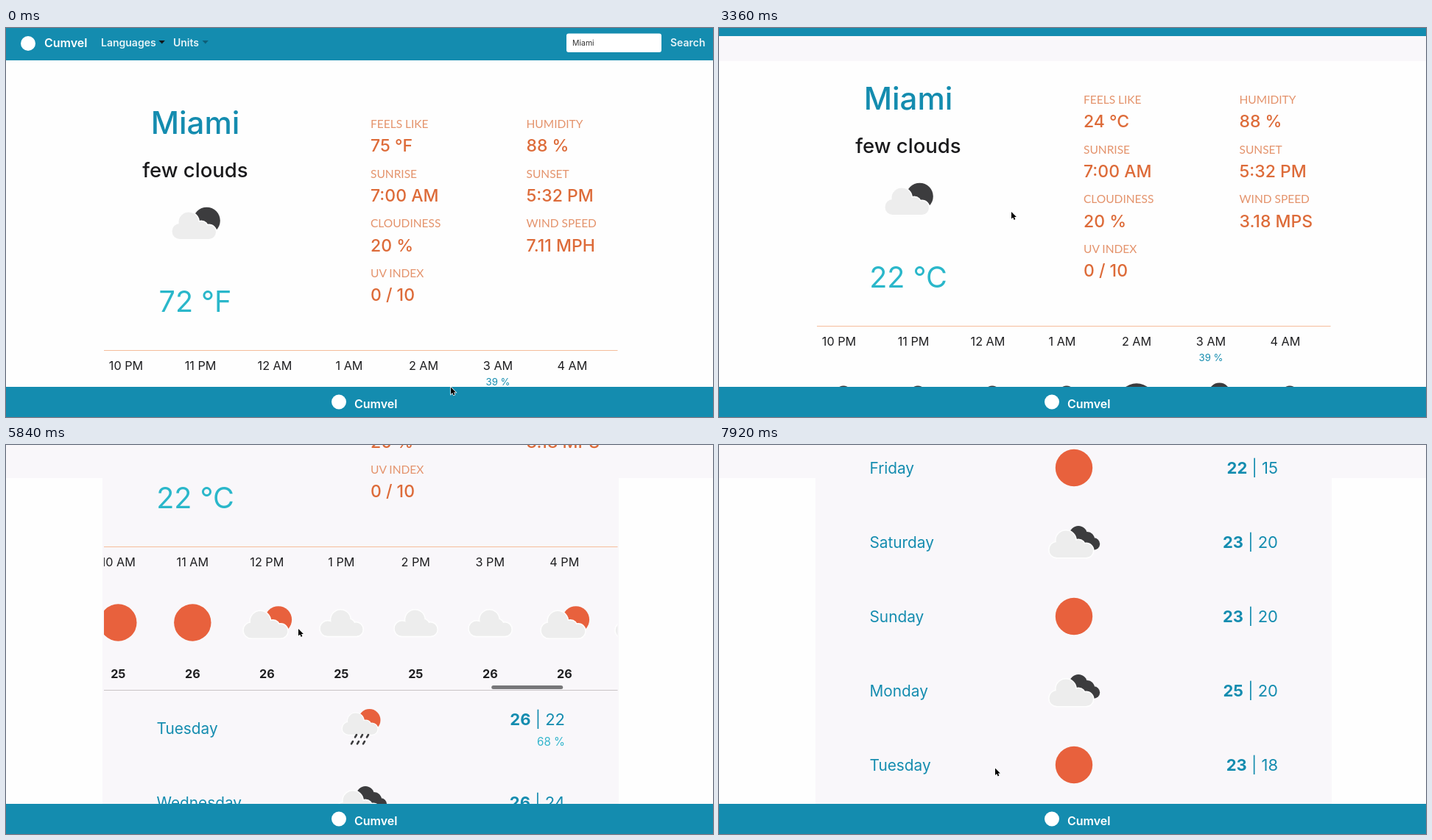
An HTML page for the animation above (8000 ms loop, 960 by 529 pixels).

```html
<!DOCTYPE html>
<html lang="en">
<head>
<meta charset="utf-8">
<title>Weather</title>
<style>
  html, body { margin: 0; height: 100%; overflow: hidden; background: #fefefe; }
  svg { display: block; font-family: Inter, "Noto Sans", sans-serif; }
  .mid { text-anchor: middle; }
  .end { text-anchor: end; }
  .brand { font-size: 16px; font-weight: 600; fill: #fff; }
  .nav { font-size: 14px; font-weight: 600; fill: #e6f3f7; }
  .small { font-size: 10.5px; fill: #333; }
  .city { font-size: 42px; font-weight: 500; fill: #148caf; }
  .sky { font-size: 27.5px; font-weight: 500; fill: #1a1a1c; }
  .now { font-size: 39.5px; fill: #2ab7ca; }
  .label { font: 15.5px Lato, sans-serif; fill: #e4936c; }
  .value { font-size: 23px; font-weight: 500; fill: #dd6b39; }
  .hour { font-size: 16.2px; fill: #1e1e20; }
  .bold { font-weight: 700; }
  .chance { font-size: 13.2px; fill: #148caf; }
  .day { font-size: 20.8px; fill: #148caf; }
  .range { font-size: 22px; fill: #148caf; }
  .dayChance { font-size: 15.2px; fill: #33b5cc; }
  .status { font: 8.6px "Liberation Sans", sans-serif; fill: #e4e4e4; }
</style>
</head>
<body>
<svg id="stage" width="960" height="529" viewBox="0 0 960 529"></svg>
<script>
const LOOP = 8000, STEP = 80;
const BLUE = '#148caf', SUN = '#e8613d', DARK = '#3c3c3e', PAPER = '#fefefe', TINT = '#f9f7fa';
const OPEN_MENU = 1360, ON_CELSIUS = 2400, CLOSE_MENU = 2640, METRIC = 2800;

const text = (x, y, cls, content, id = '') =>
  `<text x="${x}" y="${y}" class="${cls}"${id && ` id="${id}"`}>${content}</text>`;
const rect = (x, y, w, h, fill, extra = '') =>
  `<rect x="${x}" y="${y}" width="${w}" height="${h}" fill="${fill}" ${extra}/>`;
const disc = (x, y, r, fill) => `<circle cx="${x}" cy="${y}" r="${r}" fill="${fill}"/>`;
const group = (x, y, content) => `<g transform="translate(${x} ${y})">${content}</g>`;
const caret = (x, id) => `<path id="${id}" d="M${x} 17h8.4l-4.2 4.4z"/>`;

// Weather icons, each centred on 0,0
const ring = (x, y, r) =>
  `M${x - r} ${y}a${r} ${r} 0 1 1 ${2 * r} 0a${r} ${r} 0 1 1 ${-2 * r} 0z`;
const cloud = (x, y, scale = 1, peak = -9) =>
  `<path transform="translate(${x} ${y}) scale(${scale})" fill="#ededed"
    stroke="${PAPER}" stroke-width="3" paint-order="stroke"
    d="${ring(-21, 10.5, 10.5)}${ring(peak, -2, 13.5)}${ring(8, 6, 9)}${ring(18.5, 11.5, 9.5)}M-21 8h39v13h-39z"/>`;
const few = color => disc(15.5, -4, 18.3, color) + cloud(0, 0);
const drops = Array.from({ length: 6 }, (_, i) =>
  `M${-6 + i % 3 * 8 - (i > 2) * 5} ${i > 2 ? 18 : 9}l-2 3.400`).join('');
const rain = color => disc(11.5, -11, 15, color) + cloud(0, -8, .8) +
  `<path d="${drops}" stroke="${DARK}" stroke-width="2.6" stroke-linecap="round"/>`;
const icons = {
  S: disc(0, 0, 25.2, SUN),
  M: disc(0, 0, 25.2, DARK),
  C: cloud(2, -2, .97, -3),
  D: few(SUN),
  N: few(DARK),
  B: disc(6, -10, 12, DARK) + disc(18, -4, 10, DARK) + disc(27, 2.5, 8.2, DARK) + cloud(-2, 0),
  R: rain(DARK),
  W: rain(SUN)
};
const icon = (x, y, kind) => group(x, y, icons[kind]);

const header = rect(0, 0, 960, 44, BLUE) + disc(30, 21, 10, '#fff') +
  text(52, 26, 'brand', 'Cumvel') +
  text(129, 25, 'nav', 'Languages') + caret(207.5, 'langCaret') +
  text(227, 25, 'nav', 'Units') + caret(266.5, 'unitCaret') +
  rect(761, 7.5, 129, 25.5, '#fff', 'rx="3"') + text(769, 24, 'small', 'Miami') +
  text(902, 25, 'nav', 'Search');

const menu = '<g id="menu">' +
  rect(222.5, 37.5, 107, 65, '#fff', 'rx="3" stroke="#000" stroke-opacity=".16"') +
  rect(223, 38, 106, 31, '#f8f6fa', 'id="hoverRow"') + rect(223, 69, 106, 1, '#e9ecef') +
  rect(223, 75, 106, 22, '#0070fb', 'id="activeRow"') +
  text(238.5, 57.3, 'small', 'Fahrenheit') +
  text(238.5, 90.3, 'small', 'Celsius', 'celsius') + '</g>';

const details = [
  ['FEELS LIKE', '', 'feels'], ['HUMIDITY', '88 %'],
  ['SUNRISE', '7:00 AM'], ['SUNSET', '5:32 PM'],
  ['CLOUDINESS', '20 %'], ['WIND SPEED', '', 'wind'],
  ['UV INDEX', '0 / 10']
].map(([label, value, id], i) => {
  const x = i % 2 ? 706.5 : 495, y = 136 + Math.floor(i / 2) * 67.7;
  return text(x, y, 'label', label) + text(x, y + 32.3, 'value', value, id);
}).join('');

const current = text(257, 143.5, 'city mid', 'Miami') +
  text(257, 203, 'sky mid', 'few clouds') + icon(257, 266, 'N') +
  text(257, 386, 'now mid', '', 'now');

// One letter per hour for the sky, one digit for the degrees above 20
const hourSky = 'BBBBMRBBNDSSSSDCCCDDNNNM', hourDegrees = '444444332345566556653222';
const hours = [...hourSky].map((kind, i) => {
  const x = 163 + i * 101, h = (22 + i) % 24;
  return text(x, 464.5, 'hour mid', `${h % 12 || 12} ${h < 12 ? 'AM' : 'PM'}`) +
    (kind === 'R' ? text(x, 485.500, 'chance mid', '39 %') : '') +
    icon(x, 541.5, kind) + text(x, 616.5, 'hour bold mid', 2 + hourDegrees[i]);
}).join('');

const days = [
  'Tuesday W 26 22 68', 'Wednesday B 26 24', 'Thursday B 25 19', 'Friday S 22 15',
  'Saturday B 23 20', 'Sunday S 23 20', 'Monday B 25 20', 'Tuesday S 23 18'
].map((line, i) => {
  const [name, kind, high, low, chance] = line.split(' '), y = 685 + i * 101;
  return text(204.5, y + 7.5, 'day', name) + icon(482, y, kind) +
    text(759, y + (chance ? -4 : 8), 'range end', `<tspan class="bold">${high}</tspan> | ${low}`) +
    (chance ? text(759, y + 23.5, 'dayChance end', `${chance} %`) : '');
}).join('');

const footer = rect(0, 488, 960, 41, BLUE) + disc(452, 508.5, 10, '#fff') +
  text(473, 516.5, 'brand', 'Cumvel');

const statusBar = '<g id="status">' +
  rect(-4, 518, 181, 15, '#3b3b3e', 'rx="3"') + text(1, 527.5, 'status', '', 'link') + '</g>';

const pointer = '<g id="pointer">' +
  '<path id="arrow" d="M0 0v9.6l2.2-2 1.5 3.3 1.7-.8-1.5-3.1h3z" stroke="#fff" stroke-width="1.4" paint-order="stroke"/>' +
  '<path id="hand" d="M-1 0q1.2-1 2 .3v3.4l4.5 1q1.2.4 1 2l-.8 4.3h-5.7l-3.4-4.4q.2-1.6 2.4 0z" fill="#fff" stroke="#000"/></g>';

document.getElementById('stage').innerHTML =
  '<clipPath id="strip"><path d="M133 430h697.5v210h-697.5z"/></clipPath>' +
  rect(0, 0, 960, 529, PAPER) +
  rect(0, 0, 960, 45, TINT, 'id="topTint"') + rect(131, 45, 701, 443, TINT, 'id="midTint"') +
  '<g id="page">' + header + current + details +
  rect(133, 438, 697.5, 1, '#f5bd9b') +
  '<g clip-path="url(#strip)"><g id="hours">' + hours + '</g>' +
  rect(133, 627, 97, 5, '#777779', 'rx="2.5" id="thumb"') + '</g>' +
  rect(133, 633, 697.5, 1, '#c9c4c6') + days + menu + '</g>' +
  footer + statusBar + pointer;

const el = Object.fromEntries(
  [...document.querySelectorAll('#stage [id]')].map(node => [node.id, node]));
const show = (node, visible) => node.setAttribute('visibility', visible ? 'inherit' : 'hidden');
const move = (node, x, y) => node.setAttribute('transform', `translate(${x} ${y})`);

const progress = (t, start, end) => Math.min(1, Math.max(0, (t - start) / (end - start)));
function ease(t, start, end) {
  const k = progress(t, start, end);
  return k * k * (3 - 2 * k);
}

function pointerAt(t) {
  let x = 604, y = 488.5;
  const glide = (start, end, toX, toY) => {
    const k = ease(t, start, end);
    x += (toX - x) * k;
    y += (toY - y) * k;
  };
  glide(0, 960, 250, 20);
  glide(OPEN_MENU, ON_CELSIUS, 267, 88);
  glide(CLOSE_MENU, 3040, 397, 250);
  glide(6400, 6880, 375, 439.5);
  return [x, y];
}

function render(t) {
  const scroll = Math.round(300 * ease(t, 3140, 4200) + 657 * ease(t, 7120, 7920));
  const shift = 1458.5 * ease(t, 4480, 6305);
  const [x, y] = pointerAt(t);
  const metric = t >= METRIC, linked = t >= 960 && t < CLOSE_MENU;
  const unitsPicked = t >= OPEN_MENU, onCelsius = t >= ON_CELSIUS;

  move(el.page, 0, -scroll);
  move(el.hours, -shift, 0);
  move(el.thumb, Math.min(600, shift * .4304), 0);
  show(el.thumb, t >= 4560 && t < 6640);
  show(el.topTint, scroll);
  el.midTint.setAttribute('opacity', progress(t, 3200, 5600));

  el.now.textContent = metric ? '22 °C' : '72 °F';
  el.feels.textContent = metric ? '24 °C' : '75 °F';
  el.wind.textContent = metric ? '3.18 MPS' : '7.11 MPH';

  el.langCaret.setAttribute('fill', unitsPicked ? '#0f5f78' : '#10161a');
  el.unitCaret.setAttribute('fill', unitsPicked ? '#10161a' : '#0f5f78');
  show(el.menu, unitsPicked && t < CLOSE_MENU);
  show(el.hoverRow, y > 42);
  show(el.activeRow, onCelsius);
  el.celsius.style.fill = onCelsius ? '#fff' : '#333';

  show(el.status, linked);
  el.link.textContent = 'https://cumvel-weather.surge.sh/#' +
    (y > 75 ? 'action/3.2' : y > 42 ? 'action/3.1' : '');

  move(el.pointer, x, y);
  show(el.hand, linked);
  show(el.arrow, !linked);
}

function tick() {
  render(Math.floor(performance.now() % LOOP / STEP) * STEP);
  requestAnimationFrame(tick);
}
tick();
</script>
</body>
</html>
```
